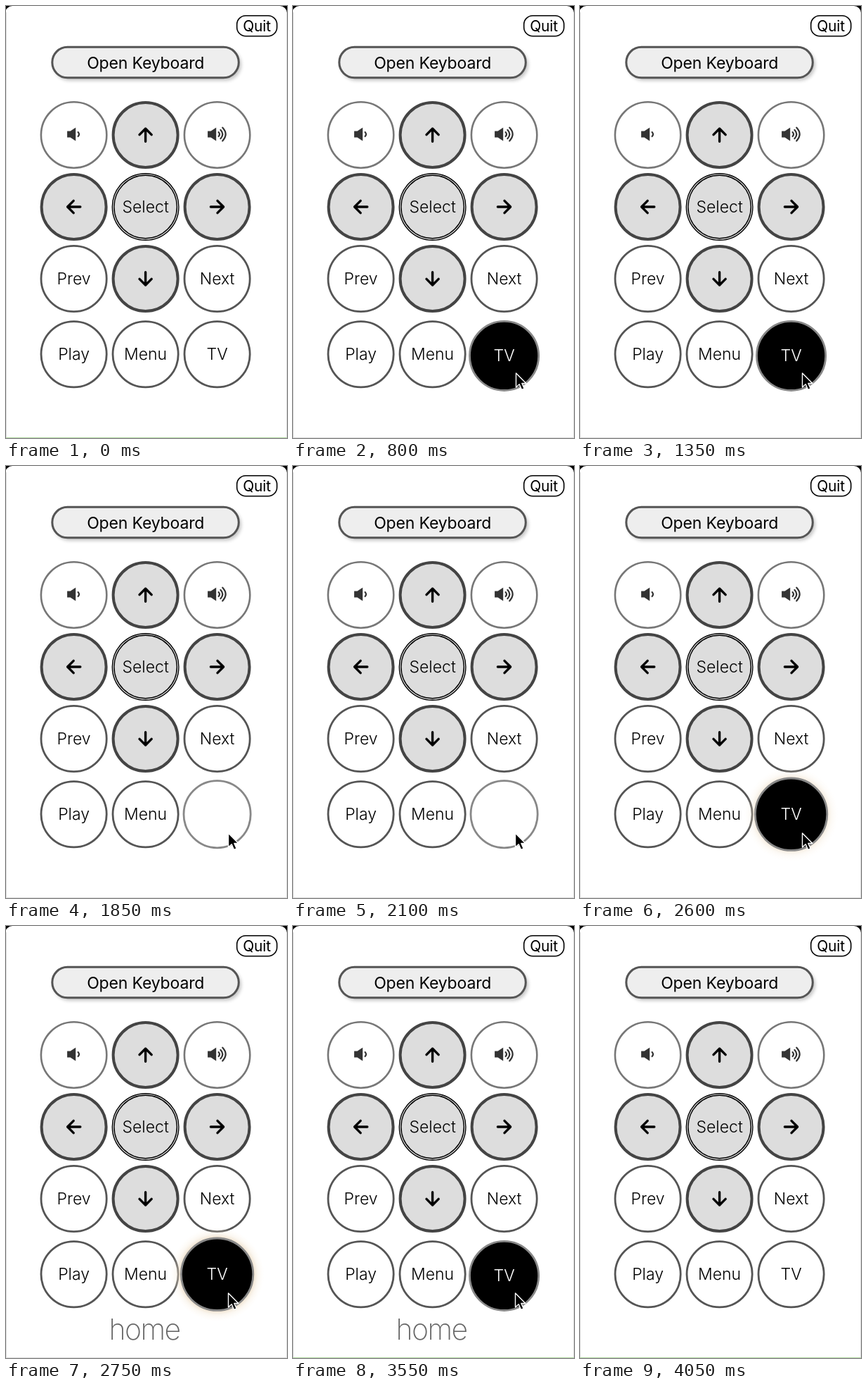
Recreate the animation shown at these times as an HTML page. Size 400 by 613 pixels, loop 4100 ms.

```html
<!DOCTYPE html>
<html lang="en">
<head>
<meta charset="utf-8">
<title>Remote</title>
<style>
  html, body { margin: 0; width: 100%; height: 100%; overflow: hidden; background: #000; }
  svg { display: block; width: 100%; height: 100%; }
  text { font-family: Inter, "Open Sans", sans-serif; text-anchor: middle; }
  .label { font-size: 23px; font-weight: 300; }
  .title { font-size: 23px; letter-spacing: -.15px; }
  .quit { font-size: 21px; letter-spacing: -.2px; }
  .home { font-size: 41px; font-weight: 200; letter-spacing: -1.6px; fill: #666; }
  .arrow { fill: none; stroke: #000; stroke-width: 3.4; stroke-linecap: round; stroke-linejoin: round; }
  .wave { fill: none; stroke: #333; stroke-width: 2.2; stroke-linecap: round; }
</style>
</head>
<body>
<svg viewBox="0 0 400 613">
  <defs>
    <filter id="soft" x="-10%" y="-30%" width="120%" height="170%"><feGaussianBlur stdDeviation="2.5"/></filter>
    <radialGradient id="halo">
      <stop offset=".78" stop-color="#e8d3b4" stop-opacity=".6"/>
      <stop offset=".87" stop-color="#f3e6d2" stop-opacity=".3"/>
      <stop offset="1" stop-color="#fff6e8" stop-opacity="0"/>
    </radialGradient>
  </defs>
  <rect x="-1" width="401" height="630" rx="10" fill="#fff"/>
  <path d="M.5 9V613M399.5 9V613" stroke="#dedede"/>
  <path id="base" d="M0 612.5H400"/>

  <rect x="328.7" y="13.7" width="57" height="29" rx="12.5" fill="#fff" stroke="#000" stroke-width="1.6"/>
  <text class="quit" x="357" y="35.7">Quit</text>

  <rect x="68" y="61" width="267" height="45" rx="22.5" fill="#000" opacity=".22" filter="url(#soft)"/>
  <rect x="65.8" y="58.3" width="265.5" height="43.5" rx="21.7" fill="#eee" stroke="#555" stroke-width="3"/>
  <text class="title" x="198.7" y="88.8">Open Keyboard</text>

  <g id="pad"></g>
  <text id="home" class="home" x="197" y="586.5">home</text>

  <g id="tv">
    <circle id="glow" r="67" fill="url(#halo)"/>
    <circle id="disc"/>
    <circle id="hole" fill="#fff"/>
    <text id="tvText" class="label" y="7.6">TV</text>
    <circle id="ring" fill="none" stroke-width="2.8"/>
  </g>
  <path id="cursor" d="M0 0V20L4.7 15.8 8 23.4 11.6 21.8 8.4 14.5H14.4Z" stroke="#fff" stroke-width="1.4" stroke-linejoin="round"/>
</svg>
<script>
const LOOP = 4100, STEP = 50, PITCH = 102;
const ENTER = 450, PRESS = 1570, RELEASE = 2145, SETTLE = 2750, LEAVE = 3550;
const $ = id => document.getElementById(id);

// The last row sits a little lower than the even grid.
const place = i => {
  const row = Math.floor(i / 3);
  return [96.6 + PITCH * (i % 3), 183 + PITCH * row + (row === 3 ? 5.2 : 0)];
};

const disc = (r, fill, stroke, width) =>
  `<circle r="${r}" fill="${fill}" stroke="${stroke}" stroke-width="${width}"/>`;
const label = s => `<text class="label" y="7.6">${s}</text>`;
const plain = s => disc(46.6, '#fff', '#555', 2.8) + label(s);
const arrow = turn => disc(46, '#ddd', '#444', 4) +
  `<path class="arrow" transform="rotate(${turn})" d="M0 9.2V-8.8M-8.6 -.4L0 -9 8.6 -.4"/>`;
const volume = waves => {
  const loud = waves > 1;
  const arcs = Array.from({ length: waves }, (_, i) => {
    const h = 3 + i * 3.2, x = (loud ? 2 : 6) + i * 2.8;
    return `<path class="wave" d="M${x} ${-1 - h}Q${x + h * .95} -1 ${x} ${h - 1}"/>`;
  });
  return disc(46.7, '#fff', '#777', 2.6) + arcs.join('') +
    `<path d="M-9.5 -4.5H-5L2.6 -9.5V9.5L-5 4.5H-9.5Z" transform="translate(${loud ? -4 : 0} -1)" fill="#333"/>`;
};
const select = disc(47.3, '#ddd', '#000', 1.4) + disc(44.7, '#ddd', '#000', 1.4) + label('Select');

const keys = [
  volume(1), arrow(0), volume(3),
  arrow(-90), select, arrow(90),
  plain('Prev'), arrow(180), plain('Next'),
  plain('Play'), plain('Menu')
];
$('pad').innerHTML = keys.map((key, i) => `<g transform="translate(${place(i)})">${key}</g>`).join('');

// Eased progress from 0 to 1.
function ramp(t, start, length) {
  const x = Math.min(1, Math.max(0, (t - start) / length));
  return 1 - Math.pow(1 - x, 2.2);
}
const gray = v => `rgb(${[v, v, v].map(Math.round)})`;
const set = (id, attrs) => {
  for (const k in attrs) $(id).setAttribute(k, attrs[k]);
};

function draw(t) {
  const leave = ramp(t, LEAVE, 500), settle = ramp(t, SETTLE, 300);
  const press = ramp(t, PRESS, 270), release = ramp(t, RELEASE, 500);
  const hover = ramp(t, ENTER, 350) - leave;
  const lift = press - settle, swell = release - settle;
  const fill = hover - press + release;
  const r = 48 + 2.5 * hover - 1.5 * lift + 3.6 * swell;
  const [x, y] = place(keys.length);

  set('tv', { transform: `translate(${x} ${y + 2.2 * (hover - lift)})` });
  set('disc', { r: r - 1 });
  set('hole', { r: Math.max(0, (r - 1) * (1 - fill)) });
  set('ring', { r: r - 1.4, stroke: gray(85 + 51 * hover) });
  set('tvText', { fill: gray(255 * hover) });
  set('glow', { opacity: ramp(t, 2500, 250) - settle });
  set('home', { opacity: ramp(t, 2660, 90) - leave });

  // The pointer comes from below right and goes back there.
  const away = 1 - ramp(t, ENTER, 250) + ramp(t, LEAVE, 350);
  const nudge = ramp(t, 1230, 120);
  set('cursor', {
    transform: `translate(${317.5 - nudge + 34 * away} ${521 + 82 * away})`,
    visibility: away < 1 ? 'visible' : 'hidden'
  });
  set('base', { stroke: t < 500 || t >= LEAVE ? '#b5dca6' : '#dedede' });
}

const start = performance.now();
function tick() {
  const t = (performance.now() - start) % LOOP;
  draw(Math.floor(t / STEP) * STEP);
  requestAnimationFrame(tick);
}
tick();
</script>
</body>
</html>
```
